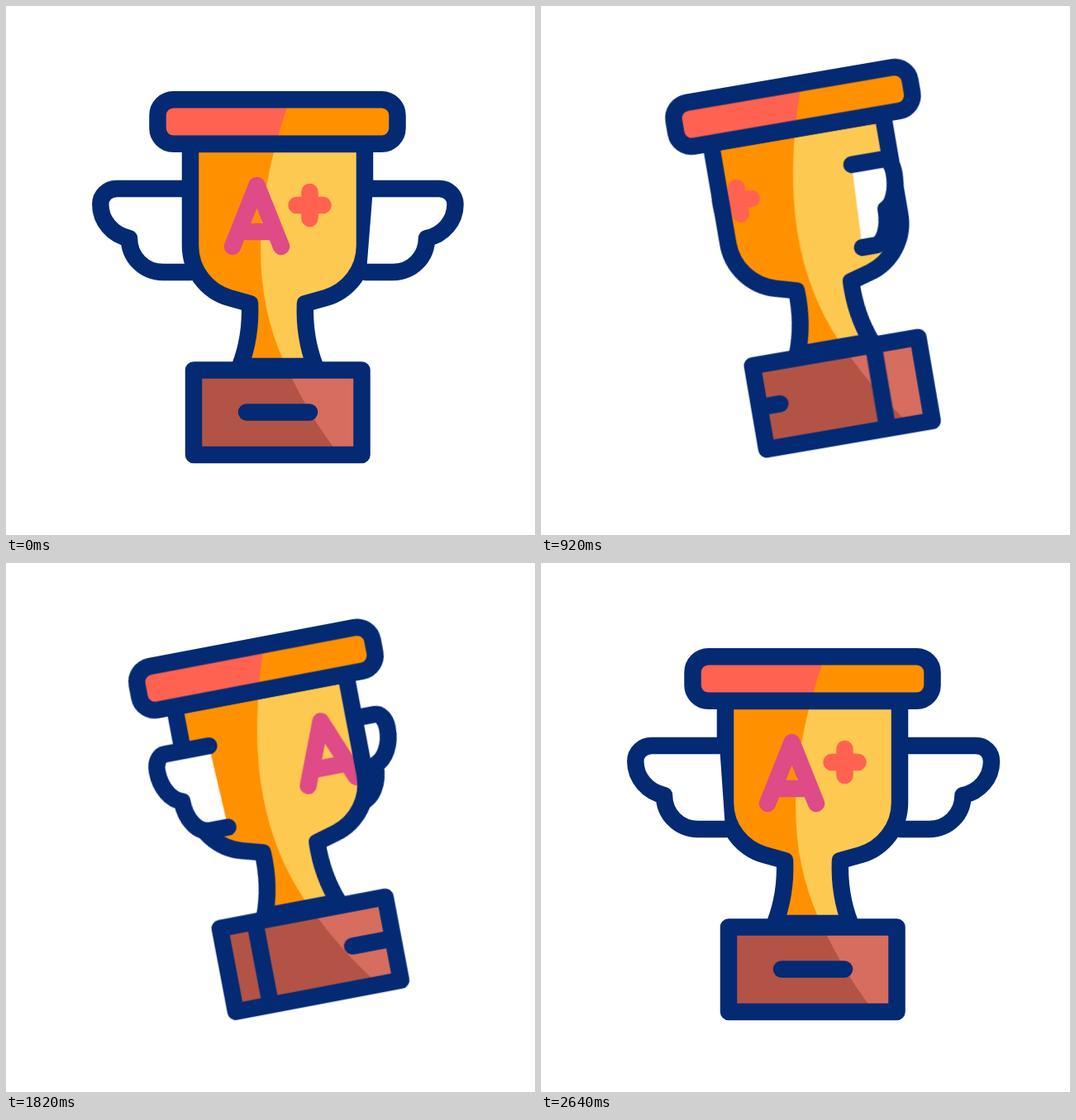
Write an HTML page that moves like this. It is 640 px wide and 640 px high and loops after 2820 ms.

```html
<!DOCTYPE html>
<html lang="en">
<head>
<meta charset="utf-8">
<title>Spinning trophy</title>
<style>
  html, body { margin: 0; width: 100%; height: 100%; overflow: hidden; background: #fff; }
  svg { display: block; width: 100%; height: 100%; }

  .line { fill: none; stroke: #042a74; stroke-width: 20.5; stroke-linecap: round; stroke-linejoin: round; }
  .wing { fill: #fff; }
  .letter { stroke: #de4b86; }
  .plus { stroke: #ff6251; }

  .jump, .tilt, .grade, .dash, .edge, .wing {
    animation: 2820ms cubic-bezier(.3333, 0, .6667, 1) infinite;
  }
  .jump { animation-name: jump; }
  .tilt { animation-name: tilt; transform-origin: 329px 279.5px; }
  .grade { animation-name: slide; --out: -170px; --in: 167px; }
  .dash { animation-name: slide; --out: -158px; --in: 166px; }
  .edge { animation-name: edge; animation-timing-function: cubic-bezier(.167, 0, .833, 1); }
  .front { animation-name: front; }
  .back { animation-name: back; }

  @keyframes jump {
    0%, 7.092%, 92.199%, 100% { transform: translateY(0); }
    28.369%, 70.922% { transform: translateY(-25.6px); }
    49.645% { transform: translateY(25.6px); }
  }
  @keyframes tilt {
    0%, 7.092%, 92.199%, 100% { transform: rotate(0deg); }
    49.645% { transform: rotate(-15deg); }
  }
  /* leaves on the left, comes back from the right */
  @keyframes slide {
    0%, 7.092% { transform: translateX(0); }
    46.099% { transform: translateX(var(--out)); }
    46.1% { transform: translateX(var(--in)); }
    85.106%, 100% { transform: translateX(0); }
  }
  @keyframes edge {
    0%, 7.092% { transform: translateX(440px); }
    85.106%, 100% { transform: translateX(221.6px); }
  }
  @keyframes front {
    0%, 7.092% { d: path("M115,221 H195 C206,221 214.5,229 214.5,240 C214.5,260 200,277 180,281 C180,304 162,322 139,322 H107"); }
    85.106%, 100% { d: path("M-113,221 H-195 C-206,221 -214.7,229 -214.7,240 C-214.7,260 -200,277 -180,281 C-180,304 -162,322 -139,322 H-106"); }
  }
  @keyframes back {
    0%, 7.092% { d: path("M-113,221 H-195 C-206,221 -214.7,229 -214.7,240 C-214.7,260 -200,277 -180,281 C-180,304 -162,322 -139,322 H-106"); }
    85.106%, 100% { d: path("M115,221 H197 C208,221 216,229 216,240 C216,260 201.5,277 181.5,281 C181.5,304 163.5,322 140.5,322 H107"); }
  }
</style>
</head>
<body>
<svg viewBox="0 0 640 640">
  <defs>
    <path id="bowl" d="M223,167 V290 C223,320 243,345 270,353 L295,360 C296,385 293,410 283,436 H374 C364,410 361,385 362,360 L387,353 C414,345 434,320 434,290 V167 Z"/>
    <rect id="base" x="227" y="440.5" width="203.5" height="102.5"/>
    <rect id="rim" x="183.5" y="113.3" width="290" height="53.4" rx="19"/>
    <path id="shade" d="M341,120 C300,240 296,340 336,430 C348,455 368,498 402,541 H500 V120 Z"/>
    <clipPath id="inBowl"><use href="#bowl"/></clipPath>
    <clipPath id="inBase"><use href="#base"/></clipPath>
    <clipPath id="inRim"><use href="#rim"/></clipPath>
  </defs>

  <g class="jump"><g class="tilt">
    <g transform="translate(329)">
      <path class="line wing back" d="M-113,221 H-195 C-206,221 -214.7,229 -214.7,240 C-214.7,260 -200,277 -180,281 C-180,304 -162,322 -139,322 H-106"/>
    </g>

    <g clip-path="url(#inBowl)">
      <use href="#bowl" fill="#ff9100"/>
      <use href="#shade" fill="#fec951"/>
      <g class="grade">
        <path class="line letter" d="M274,291 L303.5,217 L333,291 M286,273 H321"/>
        <path class="line plus" d="M351.5,241 H383.5 M367.5,225 V257"/>
      </g>
    </g>
    <use href="#bowl" class="line"/>

    <g clip-path="url(#inBase)">
      <use href="#base" fill="#b35346"/>
      <use href="#shade" fill="#d66d5e"/>
      <path class="line dash" d="M291,491.5 H367"/>
      <path class="line edge" d="M0,440 V543"/>
    </g>
    <use href="#base" class="line"/>

    <g clip-path="url(#inRim)">
      <use href="#rim" fill="#ff6251"/>
      <use href="#shade" fill="#ff9100"/>
    </g>
    <use href="#rim" class="line"/>

    <g transform="translate(329)">
      <path class="line wing front" d="M115,221 H195 C206,221 214.5,229 214.5,240 C214.5,260 200,277 180,281 C180,304 162,322 139,322 H107"/>
    </g>
  </g></g>
</svg>
</body>
</html>
```
